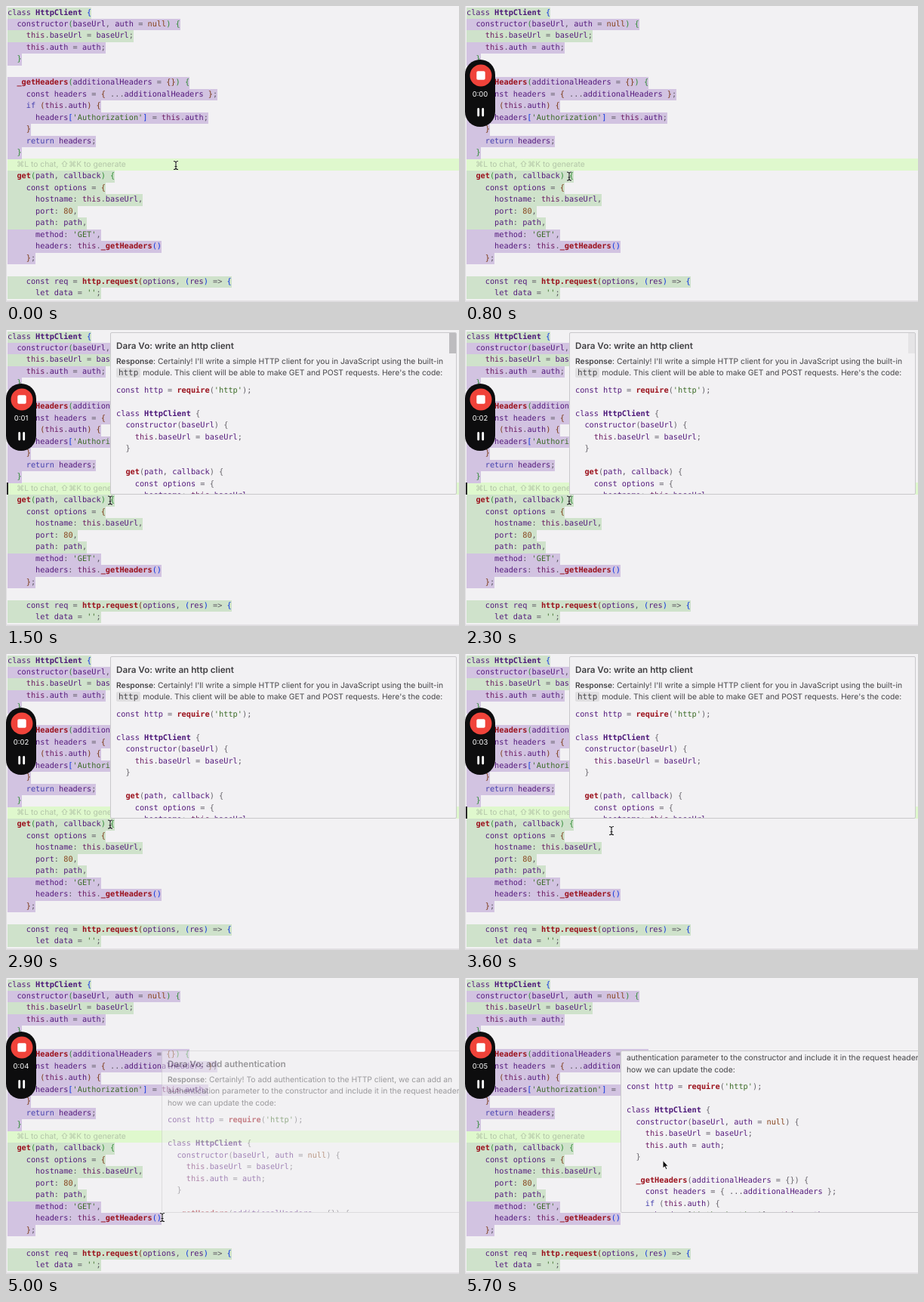
Recreate the animation shown at these times as an HTML page. Size 600 by 392 pixels, loop 5.8 s.

```html
<!DOCTYPE html>
<html lang="en">
<head>
<meta charset="utf-8">
<title>Code hover</title>
<style>
  html, body { margin: 0; width: 100%; height: 100%; overflow: hidden; background: #f2f1f3; }
  #stage { position: relative; width: 600px; height: 392px; overflow: hidden;
    background: #f2f1f3; text-rendering: geometricPrecision; }
  #stage * { box-sizing: border-box; }
  .row, .line, .abs { position: absolute; }
  .row, .line { white-space: pre; }
  .row { height: 15.48px; line-height: 15.48px;
    font: 10.27px/15.48px "DejaVu Sans Mono", "Noto Sans Mono", monospace; color: #5a5560; }
  .green { background: #cfe2cb; }
  .purple { background: #d2c3e1; }
  .line { font: 10.31px/15.48px Inter, "DejaVu Sans", sans-serif; color: #454447; }
  .title { font-size: 11.7px; font-weight: 600; color: #414043; }
  .line b { font-weight: 600; }
  .line code { font: 10.9px "DejaVu Sans Mono", monospace; background: #dfdee0;
    padding: 0 3px; border-radius: 2px; }
  .band { left: 2px; width: 598px; top: 202px; height: 15.5px; background: #dff8cd; }
  .ghost { color: #b3c5a8; }
  #caret { left: 1px; top: 202px; width: 1.5px; height: 15.5px; background: #222; }
  .popup { position: absolute; height: 215.5px; width: 459px; overflow: hidden;
    background: #f2f1f3; border: 1px solid #c9c8cb; border-radius: 2px; }
  #thumb { right: 0; top: 0; width: 9px; height: 27px; background: #bdbcbf; }
  #pill { left: 0; top: 71px; width: 40px; height: 89px; border-radius: 20px; background: #0d0d0e; }
  #pill svg { position: absolute; left: 0; top: 0; }
  #clock { left: 0; width: 40px; top: 40px; text-align: center; color: #fff; font-size: 9.5px; line-height: 14px; }
  .edge { left: 0; background: #e0dee1; }
  .mouse { position: absolute; left: 0; top: 0; overflow: visible; }
</style>
</head>
<body>
<div id="stage">
  <div id="editor"></div>
  <div class="abs edge" style="top:0;width:1px;height:392px"></div>
  <div class="abs edge" style="top:390px;width:600px;height:2px"></div>
  <div class="abs" id="caret"></div>
  <div class="popup" id="first" style="left:138px;top:2.5px">
    <div class="scroll"></div>
    <div class="abs" id="thumb"></div>
  </div>
  <div class="popup" id="second" style="left:206px;top:95.5px"><div class="scroll"></div></div>
  <div class="abs" id="pill">
    <svg width="40" height="89">
      <circle cx="21" cy="21" r="14.5" fill="#f0433a"/>
      <rect x="15.3" y="15.3" width="11.4" height="11.4" rx="1.8" fill="#fff"/>
      <path d="M17.7 65.5v8.6M23.7 65.5v8.6" stroke="#fff" stroke-width="2.8" stroke-linecap="round"/>
    </svg>
    <div class="line" id="clock">0:00</div>
  </div>
  <svg class="mouse" id="beam" width="1" height="1">
    <g fill="none">
      <path d="M-3-5.5Q0-5.5 0-3.5Q0-5.5 3-5.5M0-4V4M-3 5.5Q0 5.5 0 3.5Q0 5.5 3 5.5M-1.5 1.5H1.5" stroke="#fff" stroke-width="2.2" opacity=".5"/>
      <path d="M-3-5.5Q0-5.5 0-3.5Q0-5.5 3-5.5M0-4V4M-3 5.5Q0 5.5 0 3.5Q0 5.5 3 5.5M-1.5 1.5H1.5" stroke="#1b1b1d" stroke-width="1.1"/>
    </g>
  </svg>
  <svg class="mouse" id="arrow" width="1" height="1">
    <path d="M-1-5.5V5L1.4 2.9L3.1 6.6L4.9 5.8L3.2 2.2H6.3Z" fill="#111" stroke="#fff" stroke-width=".9"/>
  </svg>
</div>
<script>
const LOOP = 5800, STEP = 100, ROW = 15.48;
const $ = id => document.getElementById(id);

const PURPLE = '#541a7c', RED = '#9b111c', BLUE = '#4540ae', BROWN = '#87441c', GREEN = '#3b6b26';
const BRACKETS = ['#0a34e0', '#2f8a35', '#7b3814'];

// First matching rule colours the token.
const RULES = [
  [/^'/, GREEN],
  [/^(if|return)$/, BLUE],
  [/^(null|\d+)$/, BROWN],
  [/^(_getHeaders|get|require|http\.request)$/, RED, true],
  [/^HttpClient$/, '#4b1678', true],
  [/^this$/, '#6d1c63'],
  [/^\w/, PURPLE]
];

function add(parent, cls, top, left) {
  const el = document.createElement('div');
  el.className = cls;
  el.style.top = top + 'px';
  el.style.left = left + 'px';
  parent.append(el);
  return el;
}

function span(parent, text, color, bold) {
  const el = document.createElement('span');
  el.textContent = text;
  if (color) el.style.color = color;
  if (bold) el.style.fontWeight = 700;
  parent.append(el);
}

function drawCode(parent, source, top, left, marks) {
  let depth = 0;
  source.split('\n').forEach((text, i) => {
    if (!text) return;
    const mark = marks ? { g: ' green', p: ' purple' }[marks[i]] || '' : '';
    const row = add(parent, 'row' + mark, top + i * ROW, left);
    for (const token of text.match(/'[^']*'|http\.request|\w+|[()[\]{}]|\s+|[^\w\s]/g)) {
      if (/^[()[\]{}]$/.test(token)) {
        const open = '([{'.includes(token);
        if (!open) depth--;
        span(row, token, marks ? BRACKETS[depth % 3] : '#66636a');
        if (open) depth++;
      } else {
        const rule = RULES.find(r => r[0].test(token)) || [];
        span(row, token, rule[1], rule[2]);
      }
    }
  });
}

const CLASS_TOP = `class HttpClient {
  constructor(baseUrl, auth = null) {
    this.baseUrl = baseUrl;
    this.auth = auth;
  }

  _getHeaders(additionalHeaders = {}) {
    const headers = { ...additionalHeaders };
    if (this.auth) {
      headers['Authorization'] = this.auth;
    }
    return headers;
  }`;

const GET_TOP = `  get(path, callback) {
    const options = {
      hostname: this.baseUrl,`;

const editor = $('editor');
add(editor, 'abs band', 202.4, 2);
add(editor, 'line ghost', 203, 14).textContent = '⌘L to chat, ⇧⌘K to generate';
drawCode(editor, `${CLASS_TOP}

${GET_TOP}
      port: 80,
      path: path,
      method: 'GET',
      headers: this._getHeaders()
    };

    const req = http.request(options, (res) => {
      let data = '';`, 1.5, 2, 'gpgpp-ppppppp-gggggppp-gg');

function fillPopup(id, title, lines, code) {
  const box = $(id).querySelector('.scroll');
  add(box, 'line title', 10.6, 7).textContent = title;
  lines.forEach((html, i) => add(box, 'line', 31.5 + i * ROW, 7).innerHTML = html);
  drawCode(box, code, 53.7 + (lines.length - 1) * ROW, 7);
  return box;
}

const IMPORT = `const http = require('http');\n\n`;
fillPopup('first', 'Dara Vo: write an http client', [
  "<b>Response</b>: Certainly! I'll write a simple HTTP client for you in JavaScript using the built-in",
  "<code>http</code> module. This client will be able to make GET and POST requests. Here's the code:"
], `${IMPORT}class HttpClient {
  constructor(baseUrl) {
    this.baseUrl = baseUrl;
  }

${GET_TOP}`);

const scroller = fillPopup('second', 'Dara Vo: add authentication', [
  "<b>Response</b>: Certainly! To add authentication to the HTTP client, we can add an",
  "authentication parameter to the constructor and include it in the request headers. Here's",
  "how we can update the code:"
], IMPORT + CLASS_TOP);

// Each key is [time, ...values]; values ease between keys.
function at(keys, t) {
  let i = keys.findIndex(k => k[0] > t);
  if (i < 0) i = keys.length;
  const a = keys[Math.max(i - 1, 0)], b = keys[Math.min(i, keys.length - 1)];
  const u = b[0] > a[0] ? (t - a[0]) / (b[0] - a[0]) : 0;
  const e = u * u * (3 - 2 * u);
  return a.slice(1).map((v, n) => v + (b[n + 1] - v) * e);
}

const MOUSE = [[0, 225, 211], [200, 225, 211], [700, 138, 225.5], [3200, 138, 225.5],
  [3600, 194, 234], [4100, 206, 287], [4300, 206, 287], [4700, 207, 317],
  [5100, 207, 317], [5400, 263, 247]];
const PILL = [[100, -42], [300, 0]];
const FIRST = [[1000, 0], [1200, 1], [3800, 1], [3900, 0]];
const THUMB = [[1800, 1], [2300, 0.25], [2700, 0]];
const SECOND = [[4900, 0], [5100, 1]];
const SCROLL = [[5250, 0], [5650, -44.5]];

function fade(el, keys, t) {
  el.style.opacity = at(keys, t)[0];
}

function draw(t) {
  const [x, y] = at(MOUSE, t), inPopup = t >= 5200;
  for (const id of ['beam', 'arrow']) {
    $(id).style.transform = `translate(${x}px, ${y}px)`;
    $(id).style.visibility = (id === 'arrow') === inPopup ? 'visible' : 'hidden';
  }
  const blink = t % 1000;
  $('caret').style.visibility = blink >= 150 && blink < 650 ? 'visible' : 'hidden';
  $('pill').style.transform = `translateX(${at(PILL, t)[0]}px)`;
  $('clock').textContent = '0:0' + Math.max(0, Math.floor((t - 150) / 1000));
  fade($('first'), FIRST, t);
  fade($('thumb'), THUMB, t);
  fade($('second'), SECOND, t);
  scroller.style.transform = `translateY(${at(SCROLL, t)[0]}px)`;
}

const start = performance.now();
function tick() {
  const t = (performance.now() - start) % LOOP;
  draw(Math.floor(t / STEP) * STEP);
  requestAnimationFrame(tick);
}
tick();
</script>
</body>
</html>
```
